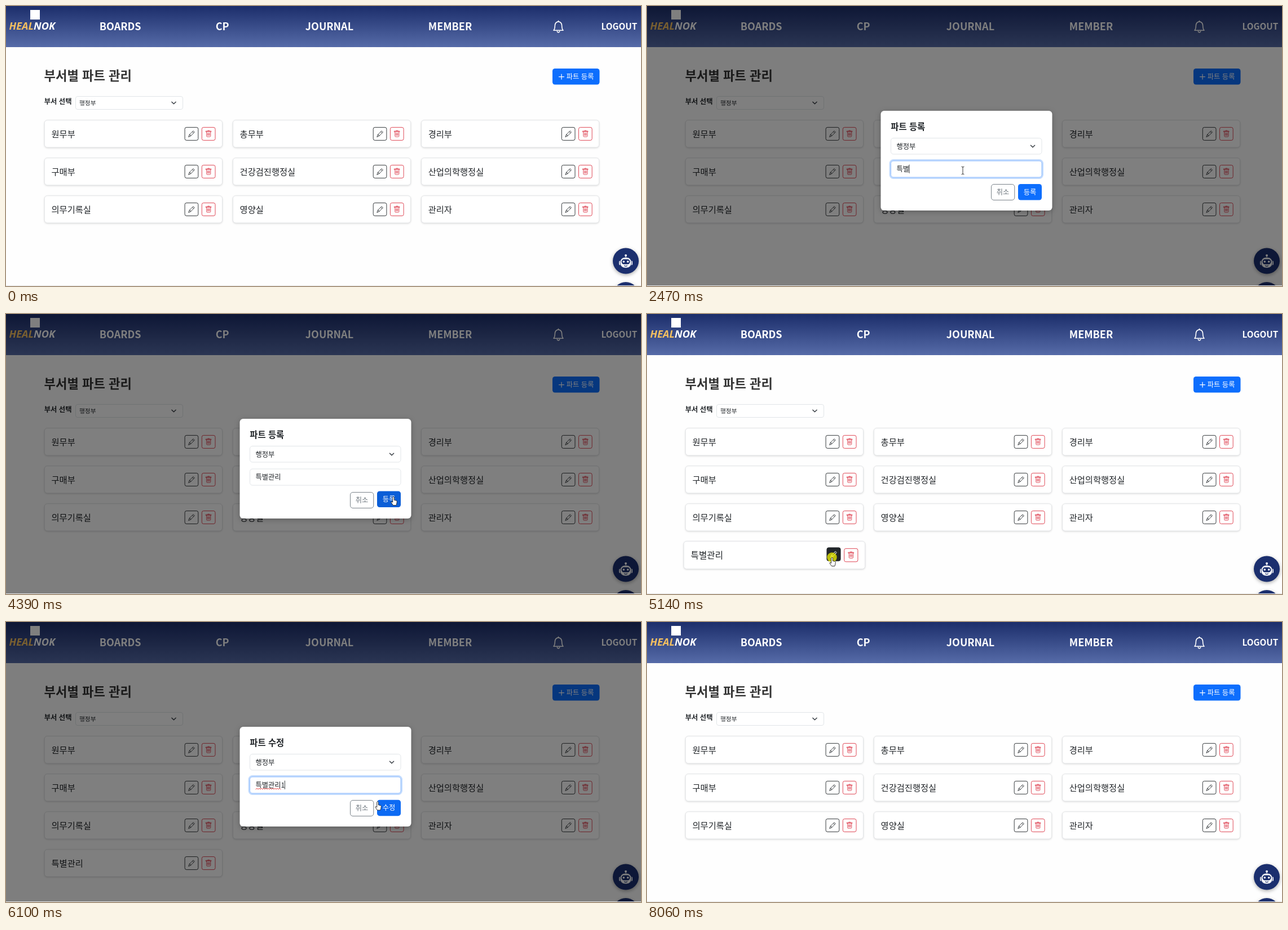
An HTML page that plays this animation: 1126 by 497 pixels, repeating every 8.79 s.

```html
<!DOCTYPE html>
<html lang="ko">
<head>
<meta charset="utf-8">
<title>부서별 파트 관리</title>
<style>
html, body { margin: 0; width: 100%; height: 100%; overflow: hidden; background: #fefefe; }
svg { display: block; width: 1126px; height: 497px; font-family: "Noto Sans CJK KR", "Noto Sans KR", "Noto Sans CJK JP", sans-serif; }
.card { filter: drop-shadow(0 1px 1.5px #0002); }
.fab { filter: drop-shadow(0 2px 3px #0005); }
.dialog { filter: drop-shadow(0 2px 5px #0004); }
.brand { font-family: "Open Sans", "Noto Sans", sans-serif; font-style: italic; }
</style>
</head>
<body>
<svg id="stage" viewBox="0 0 1126 497"></svg>
<script>
const LOOP = 8790, DARK = '#212529', BLUE = '#0d6efd', RED = '#dc3545', NAVY = '#1b2f6e';
const PARTS = ['원무부', '총무부', '경리부', '구매부', '건강검진행정실', '산업의학행정실', '의무기록실', '영양실', '관리자'];
const stage = document.getElementById('stage');

// Cursor stops: time, x, y
const TRACK = [
  [70, 1090, 190], [480, 992, 114], [950, 992, 114], [1400, 560, 292], [3490, 560, 292],
  [4050, 687, 324], [4400, 687, 324], [4950, 328, 432], [5240, 328, 432], [5650, 540, 290],
  [5790, 540, 290], [6100, 659, 318.5], [6170, 659, 318.5], [6240, 668, 326], [6400, 668, 326],
  [6620, 652, 331], [6760, 652, 331], [7250, 360, 428], [7560, 360, 428], [7930, 560, 300]
];
const CLICKS = [[560, 650], [1430, 1520], [4130, 4230], [5070, 5180], [5670, 5750], [6240, 6340], [7400, 7500]];
const TYPING = [[1620, 'ㅌ'], [2150, '트'], [2230, '특'], [2310, '특ㅂ'], [2390, '특벼'], [2470, '특별'],
  [2670, '특별ㄱ'], [2740, '특별고'], [2810, '특별과'], [2880, '특별관'], [2945, '특별관ㄹ'], [3010, '특별관리']];

const REGISTER = [969, 111, 83.5, 28.5], INPUT = [432.5, 275, 267.5, 29], SUBMIT = [658, 316, 42, 28.5];

const within = (t, a, b) => t >= a && t < b;
const modalAt = t => within(t, 650, 4460) ? '등록' : within(t, 5180, 6400) ? '수정' : '';

function cursorAt(t) {
  const i = TRACK.findIndex(k => k[0] > t);
  if (i < 1) return null;
  const [a, b] = [TRACK[i - 1], TRACK[i]];
  const u = (t - a[0]) / (b[0] - a[0]), e = u * u * (3 - 2 * u);
  return [a[1] + (b[1] - a[1]) * e, a[2] + (b[2] - a[2]) * e];
}

function inside(t, [x, y, w, h]) {
  const p = cursorAt(t);
  return !!p && p[0] >= x && p[0] <= x + w && p[1] >= y && p[1] <= y + h;
}

// Share of the last 120 ms spent over a box, which serves as the hover transition
function hover(t, box, allowed) {
  let sum = 0;
  for (let i = 0; i < 8; i++) sum += inside(t - i * 15, box) && allowed(t - i * 15);
  return sum / 8;
}

const text = (s, x, y, size, weight = 400, fill = DARK, more = '') =>
  `<text x="${x}" y="${y}" font-size="${size}" font-weight="${weight}" fill="${fill}" ${more}>${s}</text>`;
const rect = ([x, y, w, h], r, fill, more = '') =>
  `<rect x="${x}" y="${y}" width="${w}" height="${h}" rx="${r}" fill="${fill}" ${more}/>`;
const line = (d, color, width, more = '') =>
  `<path d="${d}" fill="none" stroke="${color}" stroke-width="${width}" stroke-linecap="round" stroke-linejoin="round" ${more}/>`;
const group = (transform, body, more = '') => `<g transform="${transform}" ${more}>${body}</g>`;
const chevron = (x, y) => line(`M${x - 3.6} ${y - 1.8}l3.6 3.6 3.6-3.6`, '#343a40', 1.4);

const PENCIL = 'M-5.2 5.2l1.5-3.8L3-5.3 5.3-3-1.4 3.7zM1.4-3.7L3.7-1.4M-3.7 1.4l.9.2.2 1 1 .2.2.9';
const TRASH = 'M-4.6-3.7h9.2v-1.2h-9.2zM-1.4-5v-.8h2.8V-5M-3.6-3.6v7.4q0 1.4 1.4 1.4h4.4q1.4 0 1.4-1.4v-7.4M-1.7-1.3v4.2M0-1.3v4.2M1.7-1.3v4.2';

function iconButton(x, y, icon, color, h) {
  const box = [x, y, 23.7, 23], style = `stroke="${color}" stroke-width=".9"`;
  return group(`translate(0 ${-1.5 * h})`, rect(box, 3, color, `fill-opacity="${h}" ${style}`) +
    line(icon, h > .5 ? '#fff' : color, .85, `transform="translate(${x + 11.9} ${y + 11.5})"`));
}

function card(name, i, t) {
  const x = 68.3 + i % 3 * 334.1, y = 202.7 + Math.floor(i / 3) * 67.05, box = [x, y, 315.2, 48.2];
  const free = s => !modalAt(s);
  const over = b => hover(t, b, free);
  const cx = x + 157.6, cy = y + 24.1, scale = 1 + .02 * over(box);
  const edit = [x + 248.8, y + 12.7, 24, 23], remove = [x + 279, y + 12.7, 24, 23];
  return group(`translate(${cx} ${cy}) scale(${scale}) translate(${-cx} ${-cy})`,
    rect(box, 5, '#fff', 'stroke="#dfe1e4" stroke-width=".9" class="card"') +
    text(name, x + 12.2, y + 30.3, 15.3, 500) +
    iconButton(edit[0], edit[1], PENCIL, DARK, over(edit)) +
    iconButton(remove[0], remove[1], TRASH, RED, over(remove)));
}

function header() {
  const nav = [['BOARDS', 167], ['CP', 373], ['JOURNAL', 532], ['MEMBER', 750]];
  return `<defs><linearGradient id="sky" x2="0" y2="1"><stop stop-color="#1c2e6b"/><stop offset="1" stop-color="#566ba8"/></linearGradient></defs>` +
    rect([0, 0, 1126, 73], 0, 'url(#sky)') +
    rect([43, 7, 17, 17], 0, '#fff') +
    text('HEAL<tspan fill="#fff">NOK</tspan>', 5.5, 42, 18.2, 700, '#f3bf60', 'class="brand"') +
    nav.map(([s, x]) => text(s, x - 1.2, 42.6, 18, 700, '#fff')).join('') +
    line('M971 43.3q2.2-2 2.4-8.5 .2-6.2 6.1-7.2 5.9 1 6.1 7.2 .2 6.500 2.400 8.500zM977.300 45q2.200 4 4.400 0M979.500 27.500v-1.200', '#fff', 1.6) +
    text('LOGOUT', 1055.5, 41.5, 15.3, 700, '#fff');
}

function robot() {
  const dot = (x, y, r, fill) => `<circle cx="${x}" cy="${y}" r="${r}" fill="${fill}"/>`;
  return `<g class="fab">${dot(1099, 452.5, 23, NAVY)}${dot(1099, 513, 23, NAVY)}</g>` +
    dot(1099, 442.8, 2, '#fff') + line('M1099 443v5', '#fff', 1.5) +
    rect([1087, 452, 24, 8], 2.5, '#fff') +
    rect([1089, 446, 20, 19], 8.5, '#fff', `stroke="${NAVY}"`) +
    rect([1091.5, 449.5, 15, 9], 4.5, NAVY) +
    dot(1095.3, 453.8, 1.8, '#fff') + dot(1102.7, 453.8, 1.8, '#fff') +
    line('M1096.500 461q2.500 1.800 5 0', NAVY, 1.2);
}

function page(t) {
  const lift = hover(t, REGISTER, () => true);
  const added = within(t, 4460, 6400) ? ['특별관리'] : within(t, 6400, 7500) ? ['특별관리1'] : [];
  return rect([0, 0, 1126, 497], 0, '#fefefe') + header() +
    text('부서별 파트 관리', 67.6, 131.8, 22.2, 700, '#333') +
    group(`translate(0 ${-lift})`, rect(REGISTER, 4.5, BLUE) + rect(REGISTER, 4.5, '#000', `opacity="${.1 * lift}"`) +
      line('M980.500 125.600h9M985 121.100v9', '#fff', 1.2) + text('파트 등록', 993.8, 130.2, 12.3, 400, '#fff')) +
    text('부서 선택', 67.8, 173.7, 12.3, 700) +
    rect([123.5, 160.5, 190, 23], 3.5, '#fff', 'stroke="#dee2e6" stroke-width=".9"') +
    text('행정부', 130, 176.200, 10.7) + chevron(297.5, 172) +
    [...PARTS, ...added].map((name, i) => card(name, i, t)).join('') + robot();
}

function dialog(t, action) {
  const editing = action === '수정';
  const typed = TYPING.filter(k => k[0] <= t).pop();
  const value = editing ? (t < 5900 ? '특별관리' : '특별관리1') : typed ? typed[1] : '';
  const focused = within(t, 1470, 4140) || within(t, 5710, 6240);
  const h = hover(t, SUBMIT, s => modalAt(s) === action);
  const field = 'stroke="#dee2e6" stroke-width=".9"';
  const caret = 442.5 + [...value].reduce((w, c) => w + (c === '1' ? 6.8 : 11.27), 0);
  let out = rect([0, 0, 1126, 497], 0, '#000', 'opacity=".5"') +
    rect([414.5, 186, 304, 177], 6, '#fff', 'class="dialog"') +
    text('파트 ' + action, 432.3, 219.8, 15.4, 700) +
    rect([432.5, 234.5, 267.5, 28.5], 4.5, '#fff', field) + text('행정부', 442.5, 253.500, 12.25) + chevron(684, 249);
  if (focused) out += rect([431, 273.5, 270.5, 32], 6, 'none', 'stroke="#c2dbfe" stroke-width="3"');
  out += rect(INPUT, 4.5, '#fff', focused ? 'stroke="#86b7fe" stroke-width=".9"' : field) +
    (value ? text(value, 442.5, 294, 12.25) : text('파트명 입력', 442.5, 294, 12.25, 400, '#595c5f'));
  if (focused && editing && t >= 5900) out += line('M443 297' + 'l2-1.800 2 1.800'.repeat(11), '#e33', .9);
  if (focused) out += line(`M${caret} 282v14.500`, DARK, .9);
  out += rect([610.5, 316.5, 41.3, 28], 4.5, '#fff', 'stroke="#6c757d" stroke-width=".9"') +
    text('취소', 631, 334.8, 12.25, 400, '#6c757d', 'text-anchor="middle"') +
    group(`translate(0 ${-1.5 * h})`, rect(SUBMIT, 4.5, BLUE) + rect(SUBMIT, 4.5, '#000', `opacity="${.15 * h}"`) +
      text(action, 679, 334.8, 12.25, 500, '#fff', 'text-anchor="middle"'));
  return out;
}

function pointer(t, action) {
  const p = cursorAt(t);
  if (!p) return '';
  const onButton = [248.8, 279].some(dx => [0, 1, 2, 3].some(r => [0, 1, 2].some(c =>
    inside(t, [68.3 + dx + c * 334.1, 215.4 + r * 67.05, 24, 23]))));
  const hand = action ? inside(t, SUBMIT) : onButton || inside(t, REGISTER);
  const shape = d => `<path d="${d}" fill="#fff" stroke="#222" stroke-width=".9" stroke-linejoin="round"/>`;
  const glyph = hand ? shape('M-1.300 1.200q1.300-2.400 2.600 0v5l4 1q1.200.4 1 2l-.6 3.800-.8 2.500h-5.400l-3.200-4.500q-1-1.800.6-2l1.800 1.300z')
    : action && inside(t, INPUT) ? line('M-2-7q2 0 2 1.500v11q0 1.500-2 1.500M2-7q-2 0-2 1.500M0 5.500q0 1.500 2 1.500', '#222', .9)
    : shape('M0 0v10.500l2.500-2.200 1.700 3.700 1.600-.7-1.700-3.700h3.400z');
  const pressed = CLICKS.some(([a, b]) => within(t, a, b));
  return group(`translate(${p})`, (pressed ? '<circle r="8.7" fill="#ff0" opacity=".7"/>' : '') + glyph);
}

let last = '';
function draw(now) {
  const t = now % LOOP, action = modalAt(t);
  const next = page(t) + (action ? dialog(t, action) : '') + rect([0, 496, 1126, 1], 0, '#e6e6e6') + pointer(t, action);
  if (next !== last) stage.innerHTML = last = next;
  requestAnimationFrame(draw);
}
draw(0);
</script>
</body>
</html>
```
